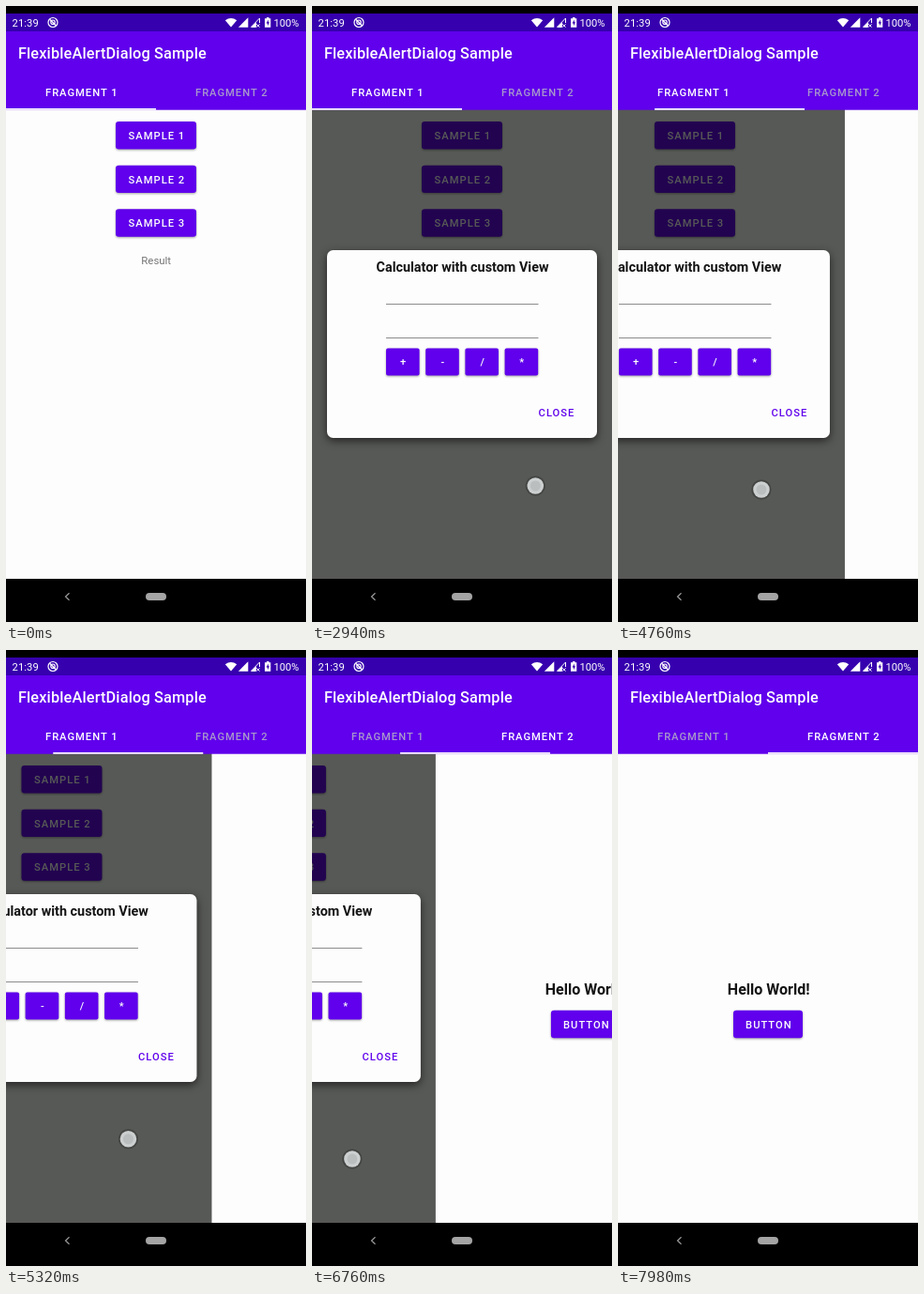
Recreate the animation shown at these times as an HTML page. Size 320 by 656 pixels, loop 8000 ms.

```html
<!DOCTYPE html>
<html lang="en">
<head>
<meta charset="utf-8">
<title>Dialog sample</title>
<style>
  html, body { margin: 0; width: 100%; height: 100%; overflow: hidden; background: #000; }
  svg { display: block; width: 100%; height: 100%; font-family: Roboto, sans-serif; }
  .caps { font-size: 11.2px; font-weight: 500; letter-spacing: 1px; }
  .mid { text-anchor: middle; }
  .bold { font-weight: 700; fill: #141414; }
  .raised { filter: drop-shadow(0 1px 1px rgba(0, 0, 0, .35)); }
</style>
</head>
<body>
<svg id="stage" viewBox="0 0 320 656"></svg>
<script>
const PURPLE = '#6000ec', PAPER = '#fcfdfc', MUTED = '#a898cc';
const LOOP = 8000;

const rect = (x, y, w, h, fill, extra = '') =>
  `<rect x="${x}" y="${y}" width="${w}" height="${h}" fill="${fill}" ${extra}/>`;

const button = (x, y, w, h, label, radius = 3.3) =>
  rect(x, y, w, h, PURPLE, `rx="${radius}" class="raised"`) +
  `<text class="caps mid" x="${x + w / 2 + .9}" y="${y + h / 2 + 4.1}" fill="${PAPER}">${label}</text>`;

const statusBar = `
  ${rect(0, 8, 320, 19, '#3600ae')}
  <g fill="#fff" font-size="11.2">
    <text x="6.5" y="22" letter-spacing=".1">21:39</text>
    <text x="285.5" y="22">100%</text>
    <path d="M233.8 15.2Q240 10.8 246.2 15.2L240 22.6Z"/>
    <path d="M258.3 12.3V22.8H247.8Z"/>
    <path d="M270.5 13V18M266.5 22.3H261.5L270.5 13M267.3 19.3L270.5 22.5M270.5 19.3L267.3 22.5" fill="none" stroke="#fff"/>
    <path d="M267 17V22.5H261.5Z"/>
    <path d="M276 13.3H278V12H280.5V13.3H282.3V22.7H276Z"/>
    <path d="M279.8 14.5L277.6 18.4H279V21.2L281 17.2H279.8Z" fill="#3600ae"/>
    <g fill="none" stroke="#fff" stroke-width="1.2">
      <circle cx="50" cy="17.5" r="5"/>
      <circle cx="50" cy="17.2" r="2.2"/>
      <path d="M47 14.5L53.5 21"/>
    </g>
  </g>`;

const appBar = `
  ${rect(0, 27, 320, 83.7, PURPLE)}
  <text x="12.9" y="56" font-size="16.3" font-weight="500" letter-spacing=".16" fill="#fff">FlexibleAlertDialog Sample</text>
  <text id="tab1" class="caps mid" x="80.8" y="96">FRAGMENT 1</text>
  <text id="tab2" class="caps mid" x="240.8" y="96">FRAGMENT 2</text>
  ${rect(0, 109, 160, 1.7, '#fff', 'id="indicator"')}`;

const dialog = `
  <g id="dialog">
    ${rect(0, 110, 320, 500, '#020500', 'opacity=".66"')}
    ${rect(16, 260, 288, 200, PAPER, 'rx="6.5" style="filter:drop-shadow(0 3px 5px rgba(0,0,0,.6))"')}
    <text class="bold mid" x="160.5" y="283" font-size="14.4">Calculator with custom View</text>
    ${rect(79, 317, 162.5, 1, '#8c8c8c')}
    ${rect(79, 353, 162.5, 1, '#8c8c8c')}
    ${['+', '-', '/', '*'].map((sign, i) => button(79 + 42.2 * i, 364.5, 35.6, 29, sign, 2)).join('')}
    <text class="caps" x="241.6" y="437.3" fill="${PURPLE}">CLOSE</text>
  </g>`;

const firstPage = `
  <g id="page1">
    ${rect(0, 110, 320, 500, PAPER)}
    ${[1, 2, 3].map(n => button(117, 76.5 + 46.6 * n, 86, 29.4, 'SAMPLE ' + n)).join('')}
    <circle id="ripple" cx="163" cy="238" fill="#fff" clip-path="url(#button3)"/>
    <text class="mid" x="160.2" y="274.5" font-size="11.4" fill="#757575">Result</text>
    ${dialog}
  </g>`;

const secondPage = `
  <g id="page2">
    ${rect(0, 110, 320, 500, PAPER)}
    <text class="bold mid" x="160.7" y="366.5" font-size="16">Hello World!</text>
    ${button(123, 383.8, 74, 29.4, 'BUTTON')}
  </g>`;

const navBar = `
  ${rect(0, 610, 320, 46, '#000')}
  <path d="M67.5 625.3L63.5 629L67.5 632.7" fill="none" stroke="#999" stroke-width="1.2"/>
  ${rect(149, 625, 22, 8, '#a4a4a4', 'rx="4"')}`;

const touchDot = `
  <g id="touch">
    <circle r="10.6" fill="#202020" opacity=".35"/>
    <circle r="8.8" fill="#cdd0d0"/>
    <circle r="5.5" fill="#bbbebe"/>
  </g>`;

const stage = document.getElementById('stage');
stage.innerHTML = `
  <clipPath id="button3"><rect x="117" y="216.3" width="86" height="29.4" rx="3.3"/></clipPath>
  ${rect(0, 0, 320, 656, '#000')}
  ${firstPage}${secondPage}${statusBar}${appBar}${navBar}${touchDot}`;

const part = id => document.getElementById(id);
const set = (id, attributes) => {
  for (const name in attributes) part(id).setAttribute(name, attributes[name]);
};
const progress = (t, from, to) => Math.min(1, Math.max(0, (t - from) / (to - from)));

// Linear interpolation through [input, output] points.
function along(points, value) {
  let result = points[0][1];
  for (let i = 1; i < points.length; i++) {
    const [a, from] = points[i - 1], [b, to] = points[i];
    if (value >= a) result = from + (to - from) * progress(value, a, b);
  }
  return result;
}

const RELEASE = 7120, RELEASE_OFFSET = 219;
const DRAG = [[3120, 0], [3680, 24], [4760, 78], [5880, 123], [6420, 160], [6760, 188], [RELEASE, RELEASE_OFFSET]];
const FINGER_Y = [[0, 511], [24, 512], [78, 515], [123, 526.5], [188, 542], [219, 549]];

function pageOffset(t) {
  if (t < RELEASE) return along(DRAG, t);
  const settle = 1 - (1 - progress(t, RELEASE, 7960)) ** 2;
  return RELEASE_OFFSET + (320 - RELEASE_OFFSET) * settle;
}

function draw(t) {
  const offset = pageOffset(t);
  set('page1', { transform: `translate(${-offset})` });
  set('page2', { transform: `translate(${320 - offset})` });
  set('indicator', { x: offset / 2 });
  set('tab1', { fill: offset < 160 ? '#fff' : MUTED });
  set('tab2', { fill: offset < 160 ? MUTED : '#fff' });
  set('dialog', { visibility: t >= 1580 ? 'visible' : 'hidden' });
  set('ripple', {
    r: 60 * progress(t, 800, 1300),
    opacity: .26 * (1 - progress(t, 1660, 2200))
  });

  const tapping = t >= 760 && t < 1400;
  const dragging = t >= 2830 && t < RELEASE;
  const x = tapping ? 163 : 231 - offset + 9 * (1 - progress(t, 2900, 3120));
  const y = tapping ? 238 : along(FINGER_Y, offset);
  set('touch', {
    transform: `translate(${x} ${y})`,
    visibility: tapping || dragging ? 'visible' : 'hidden'
  });
}

const start = performance.now();
function tick() {
  draw((performance.now() - start) % LOOP);
  requestAnimationFrame(tick);
}
tick();
</script>
</body>
</html>
```
